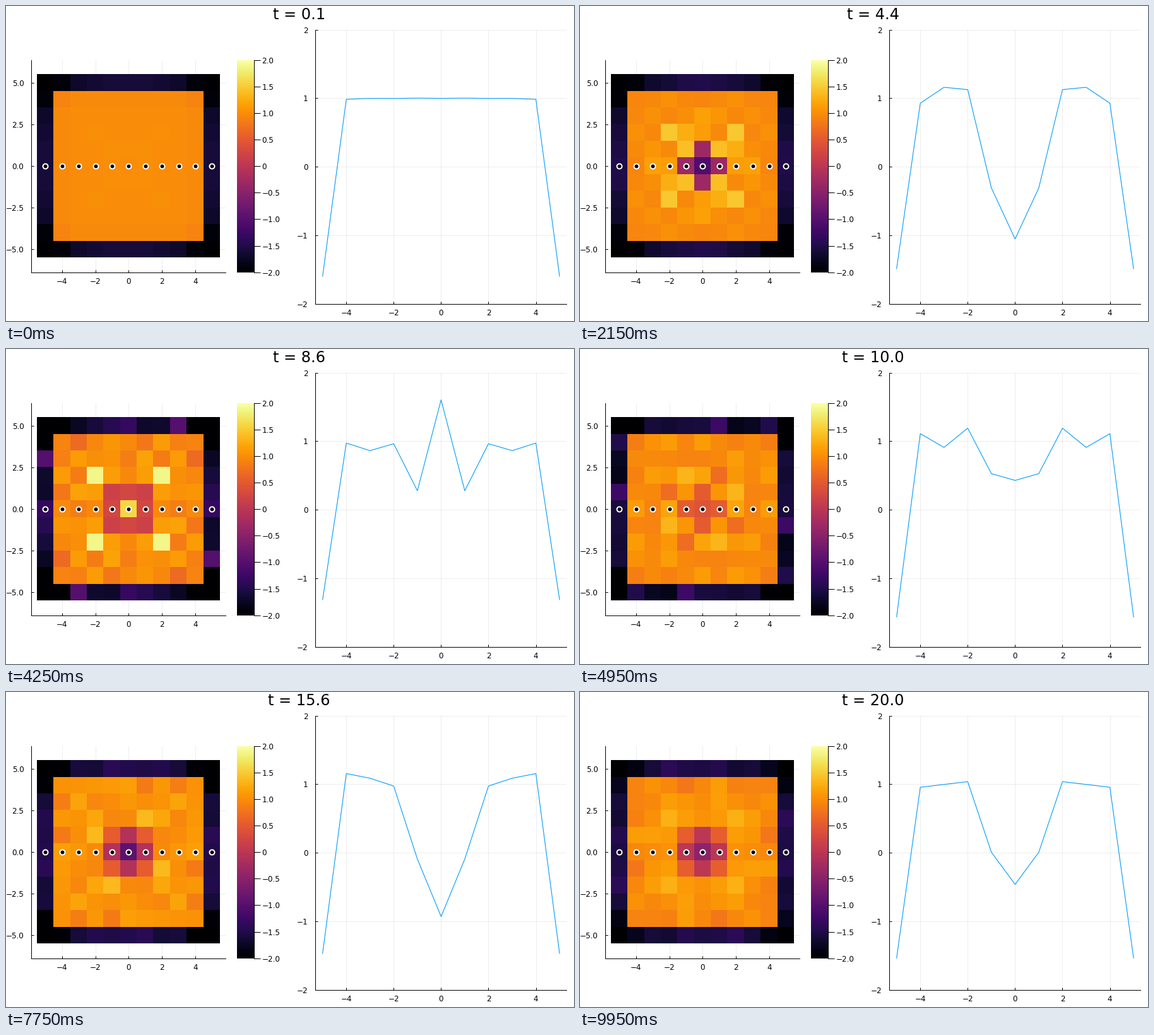
A matplotlib script for the animation above (10000 ms loop, 900x500 px).

```python
import numpy as np
import matplotlib.pyplot as plt
from matplotlib.animation import FuncAnimation

W, H, DPI = 900, 500, 100
FRAMES, INTERVAL, DT = 200, 50, 0.1
R = 5                       # lattice runs from -R to R
N = 2 * R + 1
PX = 72 / DPI               # points per pixel

plt.rcParams["font.family"] = "DejaVu Sans"

# --- two-band Chern insulator on an open square lattice ---
SX = np.array([[0, 1], [1, 0]], complex)
SY = np.array([[0, -1j], [1j, 0]])
SZ = np.diag([1, -1]).astype(complex)

coords = np.arange(-R, R + 1)
ys, xs = (a.ravel() for a in np.meshgrid(coords, coords, indexing="ij"))
X, Y = np.repeat(xs, 2), np.repeat(ys, 2)


def hamiltonian(mass):
    shift, one = np.eye(N, k=-1), np.eye(N)
    hop = (np.kron(np.kron(one, shift), (SZ - 1j * SX) / 2)
           + np.kron(np.kron(shift, one), (SZ + 1j * SY) / 2))
    return np.kron(np.diag(mass), SZ) + hop + hop.conj().T


def chern_marker(states):
    """Local Chern marker of the filled states, one value per site."""
    bra = states.conj().T
    gx = (bra * X) @ states
    gy = (bra * Y) @ states
    diag = np.sum((states @ (gx @ gy)) * states.conj(), axis=1)
    return 4 * np.pi * diag.imag.reshape(N, N, 2).sum(axis=2)


# Start in the ground state of m = 1, then flip the mass of the central 3x3
mass = np.ones(N * N)
filled = np.linalg.eigh(hamiltonian(mass))[1][:, :N * N]
mass[(abs(xs) < 2) & (abs(ys) < 2)] = -1
energy, modes = np.linalg.eigh(hamiltonian(mass))
overlap = modes.conj().T @ filled


def marker_at(t):
    return chern_marker(modes @ (np.exp(-1j * energy * t)[:, None] * overlap))


# --- figure ---
fig = plt.figure(figsize=(W / DPI, H / DPI), dpi=DPI, facecolor="white")


def pixel_axes(left, top, right, bottom):
    return fig.add_axes([left / W, 1 - bottom / H,
                         (right - left) / W, (bottom - top) / H])


def signed(fmt):
    return lambda v, _: format(v, fmt).replace("-", "\u2212")


def style(ax, xlim, ylim, yticks, yfmt):
    ax.set(xlim=xlim, ylim=ylim, xticks=range(-4, 5, 2), yticks=yticks)
    ax.xaxis.set_major_formatter(signed(".0f"))
    ax.yaxis.set_major_formatter(signed(yfmt))
    ax.spines[["top", "right"]].set_visible(False)
    ax.spines[["left", "bottom"]].set_linewidth(PX)
    ax.tick_params(direction="in", length=4 * PX, width=PX, labelsize=12 * PX)
    ax.tick_params(axis="x", pad=8.5 * PX)
    ax.tick_params(axis="y", pad=12 * PX)
    ax.set_axisbelow(True)
    ax.grid(color="black", alpha=0.07, linewidth=PX)


field_ax = pixel_axes(40.4, 86, 348.4, 422.6)
# Right and bottom edges end on the whole pixel below
lo, hi = R + 0.475, R + 0.5
image = field_ax.imshow(np.zeros((N, N)), cmap="inferno", vmin=-2, vmax=2,
                        origin="lower", extent=(-hi, lo, -lo, hi),
                        interpolation="nearest", aspect="auto", zorder=1)
style(field_ax, (-5.829, 5.829), (-6.368, 6.368), np.arange(-5, 6, 2.5), ".1f")
field_ax.plot(coords, 0 * coords, "o", ms=8 * PX, mfc="black", mec="white",
              mew=2 * PX, zorder=3, snap=False)

bar_ax = pixel_axes(366.4, 86, 393.4, 422.6)
bar_ax.imshow(np.linspace(-2, 2, 256)[:, None], cmap="inferno",
              origin="lower", extent=(0, 1, -2, 2), aspect="auto")
bar_ax.set(xticks=[], yticks=np.arange(-2, 2.1, 0.5))
bar_ax.yaxis.set_major_formatter(
    lambda v, i: signed(".1f")(v, i) if v else "0")
bar_ax.yaxis.tick_right()
bar_ax.tick_params(length=9.5 * PX, width=PX, pad=2.5 * PX, labelsize=12 * PX)
bar_ax.spines[["top", "left", "bottom"]].set_visible(False)
bar_ax.spines["right"].set_linewidth(PX)

line_ax = pixel_axes(490.4, 37.6, 888.4, 472.6)
style(line_ax, (-5.3, 5.3), (-2, 2), range(-2, 3), ".0f")
line, = line_ax.plot([], [], color="#009AFA", linewidth=1.1 * PX)

title = fig.text(464.5 / W, 1 - 21 / H, "", fontsize=24 * PX,
                 ha="center", va="baseline")


def update(i):
    t = DT * (i + 1)
    marker = marker_at(t)
    image.set_data(marker)
    line.set_data(coords, marker[R])
    title.set_text(f"t = {t:.1f}")
    return image, line, title


anim = FuncAnimation(fig, update, frames=FRAMES, interval=INTERVAL,
                     repeat=True, repeat_delay=0)
plt.show()
```
